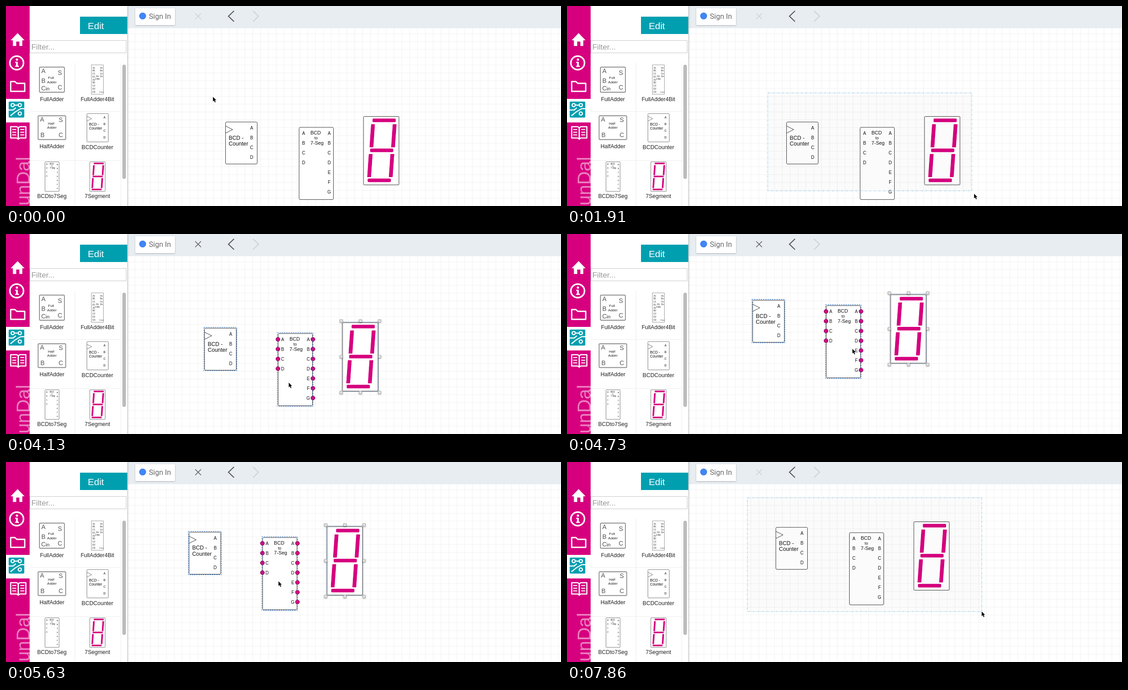
Animation of 1245 by 450 pixels, one loop 8000 ms. Source, as an HTML page with a canvas:

```html
<!DOCTYPE html>
<html>
<head>
<meta charset="utf-8">
<style>
html, body { margin: 0; width: 100%; height: 100%; overflow: hidden; background: #fff; }
canvas { display: block; width: 1245px; height: 450px; }
</style>
</head>
<body>
<canvas id="stage" width="1245" height="450"></canvas>
<script>
const stage = document.getElementById('stage');
const PINK = '#d6007f', TEAL = '#009fb0', INK = '#333', GREY = '#777';
const SANS = '"Liberation Sans", Arial, sans-serif';
const LOOP = 8000, STEPS = 54;
const LAG = 0.5; // dragged things trail the pointer by this many steps
const SELECT = 20, GRAB = 25, DROP = 39.5, DESELECT = 43;

// Waypoints of the pointer: step, x, y
const POINTER = [
  [0, 464, 204], [2, 450, 195], [7.5, 786, 314], [8, 830, 334], [16, 929, 442], [SELECT, 929, 442],
  [GRAB, 700, 376], [27.5, 653, 327], [28, 634, 334], [30.5, 602, 290], [32, 640, 258],
  [34.5, 714.5, 324], [35, 735, 320], [35.5, 713, 310], [38, 611, 268], [DROP, 676, 262],
  [41, 676, 262], [DESELECT, 632, 370], [44, 510, 205], [45, 444, 129], [47, 404, 80],
  [52.5, 930, 336], [53, 930, 336]
];

// Smooth interpolation through the waypoints without overshoot
function pointerAt(step) {
  const slope = (i, axis) => {
    const a = POINTER[i], b = POINTER[i + 1];
    return a && b ? (b[axis] - a[axis]) / (b[0] - a[0]) : 0;
  };
  const tangent = (i, axis) => {
    const before = slope(i - 1, axis), after = slope(i, axis);
    return before * after > 0 ? 2 * before * after / (before + after) : 0;
  };
  let i = 0;
  while (i < POINTER.length - 2 && POINTER[i + 1][0] <= step) i++;
  const a = POINTER[i], b = POINTER[i + 1], span = b[0] - a[0];
  const k = Math.min(1, Math.max(0, (step - a[0]) / span));
  return [1, 2].map(axis =>
    a[axis] + (b[axis] - a[axis]) * k * k * (3 - 2 * k) +
    span * k * (1 - k) * (tangent(i, axis) * (1 - k) - tangent(i + 1, axis) * k));
}

function offsetAt(step) {
  const from = pointerAt(GRAB);
  const to = pointerAt(Math.min(DROP, Math.max(GRAB, step - LAG)));
  return [to[0] - from[0], to[1] - from[1]];
}

let g = stage.getContext('2d');

function finish(fill, stroke, width) {
  if (fill) { g.fillStyle = fill; g.fill(); }
  if (stroke) { g.strokeStyle = stroke; g.lineWidth = width; g.stroke(); }
}
function rect(x, y, w, h, fill, stroke, width = 1, radius = 0) {
  g.beginPath();
  g.roundRect(x, y, w, h, radius);
  finish(fill, stroke, width);
}
function circle(x, y, r, fill, stroke, width = 1) {
  g.beginPath();
  g.arc(x, y, r, 0, 7);
  finish(fill, stroke, width);
}
function line(points, stroke, width = 1) {
  g.beginPath();
  points.forEach(([x, y]) => g.lineTo(x, y));
  finish(null, stroke, width);
}
function shape(points, fill, stroke, width = 1) {
  g.beginPath();
  points.forEach(([x, y]) => g.lineTo(x, y));
  g.closePath();
  finish(fill, stroke, width);
}
function text(str, x, y, size, color = '#111', align = 'left', font = SANS) {
  g.font = `${size}px ${font}`;
  g.fillStyle = color;
  g.textAlign = align;
  g.fillText(str, x, y);
}
function column(labels, x, y, size = 10, gap = 22) {
  labels.forEach((label, i) => text(label, x, y + i * gap + size * 0.36, size, '#111', 'center'));
}
function shadowed(color, blur, dy, draw) {
  g.save();
  g.shadowColor = color;
  g.shadowBlur = blur;
  g.shadowOffsetY = dy;
  draw();
  g.restore();
}
function placed(x, y, scale, draw, ink) {
  g.save();
  g.translate(x, y);
  g.scale(scale, scale);
  draw(ink, 1 / scale);
  g.restore();
}

function counter(ink = INK, width = 1) {
  rect(0, 0, 71, 94.5, '#fff', ink, width, 2.5);
  line([[0, 9], [16, 17], [0, 25]], ink, width);
  text('BCD -', 7, 39.5, 12.3);
  text('Counter', 7, 52.8, 12.3);
  column([...'ABCD'], 58.5, 13.3);
}
function decoder(ink = INK, width = 1) {
  rect(0, 0, 77, 162.5, '#fff', ink, width, 2.5);
  column([...'ABCD'], 10, 13);
  column([...'ABCDEFG'], 67.5, 13.5);
  text('BCD', 37, 16, 11, '#111', 'center');
  text('to', 38, 26.8, 9, '#111', 'center');
  text('7-Seg', 40.3, 38.5, 11, '#111', 'center');
}
function display(ink = INK, width = 1) {
  rect(0, 0, 79.5, 154, '#fff', ink, width, 1.5);
  for (let i = 0; i < 3; i++) rect(20.3 - i * 5.5, 4.8 + i * 67.5, 52, 8, PINK, null, 1, 2);
  for (const y of [18, 85]) {
    const left = 17.5 - (y - 18) / 13;
    for (const x of [left, left + 48.5]) {
      shape([[x, y], [x + 7.5, y], [x + 4, y + 51], [x - 3.5, y + 51]], PINK, PINK);
    }
  }
}
// Pins are runs of x, y, count
const PARTS = [
  { draw: counter, x: 492.5, y: 261, w: 71, h: 94.5, pins: [[-0.5, 16.5, 1], [71, 13, 4]] },
  { draw: decoder, x: 657.5, y: 273, w: 77, h: 162.5, pins: [[-0.5, 13, 4], [78, 13, 7]] },
  { draw: display, x: 802, y: 248.5, w: 79.5, h: 154, pins: [[0, 9.5, 7]] }
];

function icons() {
  shape([[10.5, 77], [26, 61], [41.5, 77]], '#fff');
  rect(15.5, 76, 7.5, 14, '#fff');
  rect(30, 76, 6.5, 14, '#fff');
  rect(15.5, 75, 21, 5, '#fff');

  circle(24, 128, 15.3, null, '#fff', 3.4);
  circle(24.5, 120.5, 2.6, '#fff');
  rect(22.5, 125.5, 4, 11, '#fff');
  rect(20.5, 125.5, 4, 2.5, '#fff');
  rect(20.5, 134.5, 8.5, 2.5, '#fff');

  g.lineJoin = 'round';
  shape([[10.5, 170], [20, 170], [24, 174], [42, 174], [42, 192], [10.5, 192]], null, '#fff', 3);

  rect(0, 209, 53, 53, '#fff');
  rect(6, 215, 35, 36, TEAL, null, 1, 2);
  for (const [x, y] of [[15, 223], [31, 223], [31, 242]]) circle(x, y, 3.6, null, '#fff', 2.4);
  line([[18.5, 223], [27, 223]], '#fff', 2.4);
  line([[6, 234], [16, 234], [22, 229]], '#fff', 2.4);
  line([[10, 247], [21, 238], [33, 231], [41, 231]], '#fff', 2.4);

  for (const side of [-1, 1]) {
    const x = d => 27.5 + side * d;
    shape([[x(0), 274], [x(3.5), 271.5], [x(17), 271.5], [x(17), 297], [x(3.5), 297], [x(0), 299.5]],
      null, '#fff', 2.6);
    for (let y = 278; y <= 290; y += 6) line([[x(4.5), y], [x(13.5), y]], '#fff', 2);
  }
  g.lineJoin = 'miter';

  g.save();
  g.translate(53, 449);
  g.rotate(-Math.PI / 2);
  text('unDal', 0, 0, 42, 'rgba(255,255,255,.5)');
  g.restore();
}

function adder(x, y, w, h, name, nameY) {
  rect(x, y, w, h, '#fff', '#8c8c8c', 1.8, 2);
  text(name, 101, nameY, 8, '#222', 'center', `bold ${SANS}`.replace('bold ', ''));
  text('Adder', 103, nameY + 9.5, 8, '#222', 'center');
  text('A', x + 9, y + 13, 14, '#555', 'center');
}

function library() {
  for (const x of [154.5, 257.5]) line([[x, 128], [x, 450]], '#ececec');
  for (const y of [237.5, 347.5]) line([[53, y], [258, y]], '#ececec');
  rect(261, 132, 8, 257, '#bcbcbc', null, 1, 4);

  const port = (name, x, y) => text(name, x, y, 14, '#555', 'center');
  adder(75, 137.5, 56, 56.5, 'Full', 164);
  port('S', 121, 155); port('B', 84, 173); port('C', 121, 188); port('C', 84, 190);
  text('in', 89, 190, 11, INK);
  adder(72, 247, 62, 53.5, 'Half', 266.5);
  port('S', 123, 261); port('B', 82, 295); port('C', 123, 295);

  rect(191.5, 132.5, 27, 66, '#fff', '#999');
  column('A1 B1 C1 D1 A2 B2 C2 D2 Cin'.split(' '), 197, 139, 4.6, 6.75);
  column('As Bs Cs Ds'.split(' '), 214, 139, 4.6, 6.5);
  column(['FA', '4 Bit'], 205, 158.5, 4.8, 6);
  column(['Cout'], 214, 193.5, 4.4);

  placed(181.5, 242, 0.675, counter, GREY);
  placed(87.5, 350.5, 0.41, decoder, GREY);
  placed(188, 350.5, 0.433, display, GREY);

  const label = (name, x, y) => text(name, x, y, 12.5, '#222', 'center');
  label('FullAdder', 103, 213.5);
  label('FullAdder4Bit', 205, 213.5);
  label('HalfAdder', 103, 320);
  label('BCDCounter', 205, 322);
  label('BCDto7Seg', 103, 432);
  label('7Segment', 205, 432);
}

function background() {
  rect(0, 0, 1245, 450, '#fff');
  for (let x = 289.5; x < 1245; x += 17.6) line([[x, 50], [x, 450]], '#f1f1f1');
  for (let y = 62.5; y < 450; y += 17.6) line([[273, y], [1245, y]], '#f1f1f1');
  rect(273, 0, 972, 50, '#e8edf1');

  shadowed('rgba(0,0,0,.28)', 3, 1, () => rect(290, 5, 89, 38, '#fff', null, 1, 1));
  circle(306.5, 22.5, 7.8, '#4285f4');
  text('Sign In', 320.5, 28.7, 16.4, '#666', 'left', 'Roboto, sans-serif');
  line([[511.5, 11], [499, 23], [511.5, 35]], '#5a5a5a', 2.2);
  line([[554, 11], [566.5, 23], [554, 35]], '#cfd3d6', 2.2);

  shadowed('rgba(0,0,0,.5)', 4, 0, () => rect(53, -5, 219, 460, '#fff'));
  rect(0, 0, 53, 450, PINK);
  icons();
  rect(166, 24, 106, 39, TEAL);
  text('Edit', 183.5, 52, 21, '#fff');
  rect(53.5, 77.5, 216, 28, '#fff', '#c4c4c4');
  text('Filter...', 57, 98, 17.4, '#999');
  library();
}

// Pins fade in over one step when the pointer enters and out one step after it leaves
function pinOpacity(part, step) {
  const inside = s => {
    const [px, py] = pointerAt(s), [dx, dy] = offsetAt(s);
    const x = px - part.x - dx, y = py - part.y - dy;
    return x > 0 && x < part.w && y > 0 && y < part.h;
  };
  return inside(step - 1) ? 1 : inside(step) ? 0.42 : 0;
}

function drawPart(part, step) {
  placed(part.x, part.y, 1, part.draw);
  g.globalAlpha = pinOpacity(part, step);
  for (const [x, y, count] of part.pins) {
    for (let i = 0; i < count; i++) circle(part.x + x, part.y + y + i * 22, 4.6, PINK, '#6a2050');
  }
  g.globalAlpha = 1;
}

function selection() {
  const [first, second, active] = PARTS;
  g.setLineDash([3, 2]);
  for (const { x, y, w, h } of [first, second]) rect(x - 1.7, y - 2, w + 3, h + 3.2, null, '#2f7bd6', 1.1);
  g.setLineDash([]);
  rect(active.x - 2, active.y - 2, active.w + 3.5, active.h + 3.5, null, '#9db4d2');
  shadowed('rgba(0,0,0,.35)', 3, 1, () => {
    for (let i = 0; i < 9; i++) {
      const x = 799 + i % 3 * 43, y = 244.5 + Math.floor(i / 3) * 80.5;
      if (i !== 4) rect(x - 3, y - 3, 6, 6, '#f2f2f2', '#aaa', 0.8);
    }
  });
}

function marquee(start, step) {
  const [x, y] = pointerAt(start), [right, bottom] = pointerAt(step - LAG);
  g.setLineDash([5, 2, 1.5, 2]);
  rect(x + 0.5, y + 0.5, right - x, bottom - y, 'rgba(0,0,0,.014)', '#8fc6e6');
  g.setLineDash([]);
}

function arrow(x, y) {
  g.save();
  g.translate(x, y);
  g.lineJoin = 'round';
  shape([[0.3, 0.5], [0.3, 10.8], [2.7, 8.7], [4.6, 12.9], [6.3, 12.1], [4.4, 8], [7.6, 8]], '#000', '#fff', 1);
  shape([[0.3, 0.5], [0.3, 10.8], [2.7, 8.7], [4.6, 12.9], [6.3, 12.1], [4.4, 8], [7.6, 8]], '#000');
  g.restore();
}

const screen = g;
const backdrop = document.createElement('canvas');
backdrop.width = 1245;
backdrop.height = 450;
g = backdrop.getContext('2d');
background();
g = screen;

function frame(now) {
  const step = Math.min(STEPS - 1, Math.floor((now % LOOP + 22) / (LOOP / STEPS)));
  const selected = step >= SELECT && step < DESELECT;

  g.drawImage(backdrop, 0, 0);
  const cross = selected ? '#5a5a5a' : '#cfd3d6';
  for (const d of [-6.5, 6.5]) line([[431 - d, 23 - 6.5], [431 + d, 23 + 6.5]], cross, 1.6);

  g.save();
  g.translate(...offsetAt(step));
  PARTS.forEach(part => drawPart(part, step));
  if (selected) selection();
  g.restore();

  if (step > 2 && step < SELECT) marquee(2, step);
  if (step > 47) marquee(47, step);
  arrow(...pointerAt(step));
}

function tick(now) {
  frame(now);
  requestAnimationFrame(tick);
}
frame(0);
requestAnimationFrame(tick);
</script>
</body>
</html>
```
